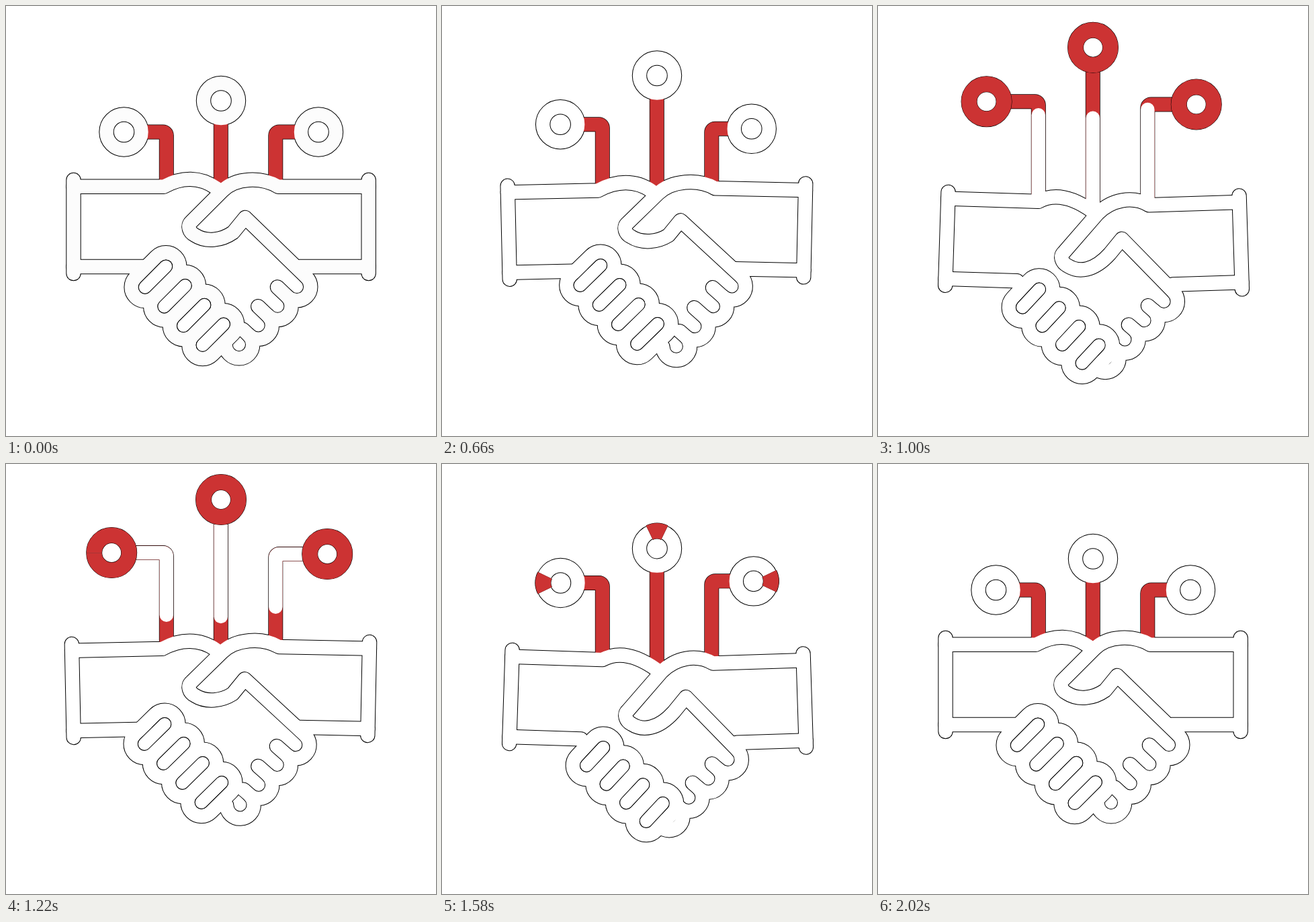
Animation, 640 px wide and 640 px high, one loop 2.2 s. Source, as an HTML page with a canvas:

```html
<!DOCTYPE html>
<html lang="en">
<head>
<meta charset="utf-8">
<title>Handshake</title>
<style>
html, body { margin: 0; width: 100%; height: 100%; overflow: hidden; background: #fff; }
canvas { display: block; width: 640px; height: 640px; }
</style>
</head>
<body>
<canvas id="stage" width="640" height="640"></canvas>
<script>
const ctx = document.getElementById('stage').getContext('2d');
const LOOP = 2200, STEP = 20, RED = '#cc3333', DARK = '#000';
const OUTER = 22.4, INNER = 20.4, FINGER = 20.3;
const START = 200, FIRST_DOWN = 450, HALF_SWING = 283, LAST_DOWN = 1582, REST = 1860;

const ramp = (t, a, b) => Math.min(1, Math.max(0, (t - a) / (b - a)));
const ease = (t, a, b) => (1 - Math.cos(Math.PI * ramp(t, a, b))) / 2;
const easeOut = (t, a, b) => 1 - (1 - ramp(t, a, b)) ** 2;
const at = (p, x, y) => [p[0] + x, p[1] + y];
const along = (p, v, k) => [p[0] + v[0] * k, p[1] + v[1] * k];

function rotate([x, y], deg) {
  const a = deg * Math.PI / 180, c = Math.cos(a), s = Math.sin(a);
  return [x * c - y * s, x * s + y * c];
}

// Rigid move: turn about a pivot, then shift.
function rigid(pivot, deg, dx, dy) {
  return (x, y) => at(rotate([x - pivot[0], y - pivot[1]], deg), pivot[0] + dx, pivot[1] + dy);
}

function line(...points) {
  const p = new Path2D();
  points.forEach((q, i) => i ? p.lineTo(...q) : p.moveTo(...q));
  return p;
}

function stroke(path, color, width, cap = 'round') {
  ctx.strokeStyle = color;
  ctx.lineWidth = width;
  ctx.lineCap = cap;
  ctx.stroke(path);
}

// press: how far the hands are lowered on average; swing: the shake, 1 down to -1 up.
function shake(t) {
  const press = ease(t, START, FIRST_DOWN) - ease(t, LAST_DOWN, REST);
  const mid = Math.min(LAST_DOWN, Math.max(FIRST_DOWN, t));
  return [press, press * Math.cos(Math.PI * (mid - FIRST_DOWN) / HALF_SWING)];
}

function hands(t) {
  const [p, s] = shake(t);
  const moved = (x, y, px, py, sx, sy) => [x + px * p + sx * s, y + py * p + sy * s];
  const left = rigid([100.5, 328.5], 1.85 * s, 1.9 * s, 12.5 * p + 5.5 * s);
  const right = rigid([539.7, 328.5], -1.8 * s, 0, 12.8 * p + 10.7 * s);
  const lWrist = left(235, 268.7), rWrist = right(405, 268.7);
  const cross = moved(322, 275, 1.5, 16.5, 3.5, 17.5);
  const thumb = moved(276, 321, 0.4, 20, 0.5, 25.8);
  const peak = moved(356, 315, 2.3, 15.6, 4.7, 16.4);
  const paths = [], slots = [];

  // Cuffs and lower sleeves.
  paths.push(line(left(100.5, 259), left(100.5, 398)), line(left(100.5, 388), left(207, 388)));
  paths.push(line(right(539.7, 259), right(539.7, 398)), line(right(539.7, 388), right(437, 388)));

  // Left back of the hand.
  const knuckles = line(left(100.5, 268.7), lWrist), end = at(cross, -9, -4);
  knuckles.bezierCurveTo(...at(lWrist, 27, -14.7), ...at(end, -24, -17), ...end);
  paths.push(knuckles);

  // Right back of the hand, thumb and index line.
  const bump = moved(433, 418, -4, 8.6, -3.5, 13.4);
  const step = rotate([-28.7, 28.7], 1.8 * s - p);
  const back = line(right(539.7, 268.7), rWrist);
  back.bezierCurveTo(...at(rWrist, -25, -14.7), ...at(cross, 20, -20), ...cross);
  back.lineTo(...thumb);
  back.bezierCurveTo(...at(thumb, -7, 6), ...at(thumb, -3, 16), ...at(thumb, 5, 20));
  back.bezierCurveTo(...at(thumb, 22, 31), ...at(thumb, 45, 28), ...at(peak, -18, 22));
  back.lineTo(...peak);
  back.lineTo(...along(bump, step, -0.5));
  paths.push(back);

  // Right fingertips and the gaps between them.
  const r = Math.hypot(...step) / 2, dir = Math.atan2(step[1], step[0]);
  const tips = new Path2D(), gap = moved(404, 418.5, -1.4, 11.9, -0.6, 16.1);
  for (let i = 0; i < 4; i++) {
    const extra = i === 3 ? 0.8 : 0;
    tips.arc(...along(bump, step, i), r, dir + Math.PI, dir + Math.PI * 2 + extra);
  }
  paths.push(tips);
  for (let i = 0; i < 3; i++) {
    const a = along(gap, step, i), b = along(bump, step, i + 0.5);
    paths.push(line(i < 2 ? a : along(a, [b[0] - a[0], b[1] - a[1]], 0.4), b));
  }

  // Left fingers: four capsules around their slots.
  const hand = rigid([238, 387.5], -0.4 * p - 1.6 * s, 2.35 * s - 0.35 * p, 13.2 * p + 21.3 * s);
  const size = 31.1 * (1 - 0.09 * p - 0.08 * s);
  for (let i = 0; i < 4; i++) {
    const x = 238 + 28.6 * i, y = 387.5 + 28.7 * i;
    const a = hand(x, y), b = hand(x - size, y + size), f = new Path2D();
    const ang = Math.atan2(b[1] - a[1], b[0] - a[0]);
    f.arc(...a, FINGER, ang + Math.PI / 2, ang + Math.PI * 1.5);
    f.arc(...b, FINGER, ang - Math.PI / 2, ang + Math.PI / 2);
    f.closePath();
    paths.push(f);
    slots.push(line(a, b));
  }
  return { paths, slots, bases: [at(lWrist, 0, -5), at(cross, 0, -8), at(rWrist, 0, -5)] };
}

// A node dips, rises and falls back; delay staggers only the rise.
function nodeAt(t, { rest, up, dip, delay }) {
  const rise = easeOut(t - delay, 380, 1240), fall = ease(t, 1370, 1720);
  const low = ease(t - delay, START, 380) * (1 - rise) + fall * (1 - ease(t, 1720, 2020));
  return along(along(rest, up, rise * (1 - fall)), dip, low);
}

// x: rod position, side: direction from rod to node, lead: head start of the pulse.
const NODES = [
  { x: 238.8, side: -1, delay: 110, lead: 0, rest: [175.5, 187.5], up: [-19, -57], dip: [11.5, 14] },
  { x: 319.8, side: 0, delay: 0, lead: 0, rest: [320, 141], up: [0, -88], dip: [0, 23] },
  { x: 401.3, side: 1, delay: 180, lead: 18, rest: [465, 187.5], up: [14.5, -57], dip: [-9.5, 10] }
];

function rod(node, base, t) {
  const { x, side, lead } = node, c = nodeAt(t, node), path = line([x, base[1]]);
  if (side) {
    path.arcTo(x, c[1], c[0], c[1], 5);
    path.lineTo(c[0] - 26 * side, c[1]);
  } else {
    path.lineTo(x, c[1] + 26);
  }
  const from = side ? (side < 0 ? 0 : Math.PI) : Math.PI / 2;
  return { path, c, from, lead, len: base[1] - c[1] + Math.abs(c[0] - x) };
}

function ring(c, from = 0, share = 1) {
  const p = new Path2D();
  p.arc(...c, 26, from - Math.PI * share, from + Math.PI * share);
  return p;
}

// White pulse running from the hands to the node.
function pulse({ path, len, lead }, t) {
  const head = Math.min(len * ramp(t + lead, 860, 1110), len - 26);
  const tail = len * ramp(t + lead, 1150, 1490);
  if (head <= tail) return;
  ctx.setLineDash([head - tail, 2000]);
  ctx.lineDashOffset = -tail;
  stroke(path, '#fff', INNER);
  ctx.setLineDash([]);
}

function draw(t) {
  const ink = t < 220 ? '#fcfcfc' : '#fff';
  const { paths, slots, bases } = hands(t);
  const rods = NODES.map((n, i) => rod(n, bases[i], t));
  const redOn = ramp(t, 700, 880), redOff = ramp(t, 1460, 1600);

  ctx.lineJoin = 'round';
  ctx.fillStyle = '#fff';
  ctx.fillRect(0, 0, 640, 640);

  paths.forEach(h => stroke(h, DARK, OUTER));
  rods.forEach(o => {
    stroke(o.path, DARK, 22, 'butt');
    stroke(ring(o.c), DARK, OUTER);
  });
  rods.forEach(o => {
    stroke(o.path, RED, 20.6, 'butt');
    pulse(o, t);
    stroke(ring(o.c), ink, INNER);
    if (redOn > 0 && redOff < 1) {
      const red = redOff > 0 ? ring(o.c, o.from + Math.PI, 1 - redOff) : ring(o.c, o.from, redOn);
      stroke(red, DARK, 24, 'butt');
      stroke(red, RED, 23, 'butt');
    }
  });
  paths.forEach(h => stroke(h, ink, INNER));
  slots.forEach(f => {
    stroke(f, DARK, 2 * FINGER - INNER);
    stroke(f, '#fff', 2 * FINGER - OUTER);
  });
}

const start = performance.now();
function tick() {
  const t = (performance.now() - start) % LOOP;
  draw(Math.floor(t / STEP) * STEP);
  requestAnimationFrame(tick);
}
tick();
</script>
</body>
</html>
```
